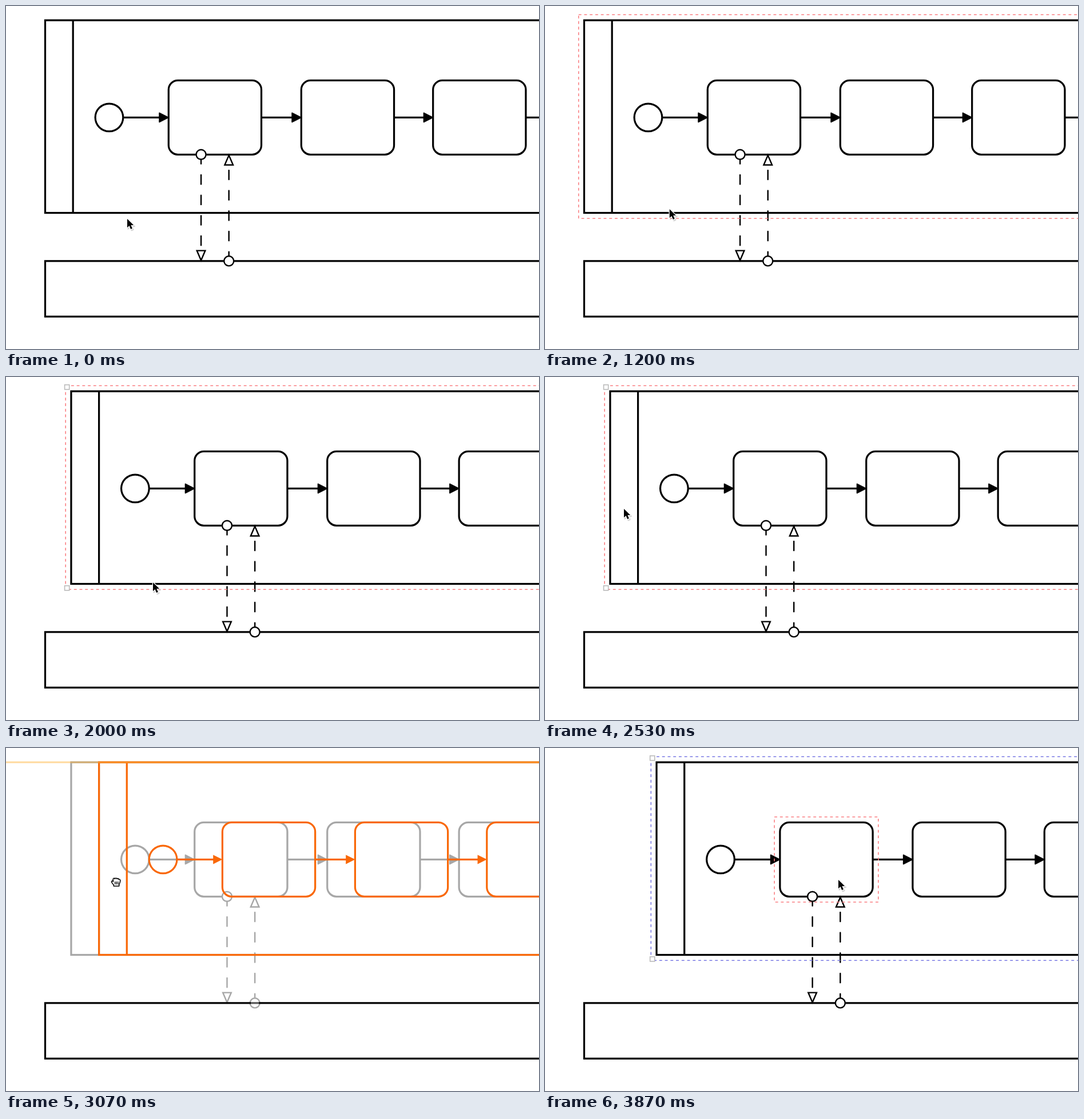
These frames come from a looping animation (932 by 601 pixels, 3990 ms). An HTML page:

```html
<!DOCTYPE html>
<html lang="en">
<head>
<meta charset="utf-8">
<title>Dragging a pool</title>
<style>
  html, body { margin: 0; width: 100%; height: 100%; overflow: hidden; background: #fff; }
  svg { display: block; width: 932px; height: 601px; }
</style>
</head>
<body>
<svg id="stage" viewBox="0 0 932 601" xmlns="http://www.w3.org/2000/svg"></svg>
<script>
// the diagram is laid out in whole units, with the pool's corner as its origin
const UNIT = 1.6225, LEFT = 68.5, TOP = 25;
const LOOP = 3990, STEP = 200 / 3;
const POOL = { x: 0, y: 0, w: 859, h: 208 };
const TASK = { x: 133, y: 65, w: 100, h: 80 };
const TASKS = [TASK.x, 276, 418];
const MID = TASK.y + TASK.h / 2, LANE = 30, LOWER = 260;
const RED = '#fa8084', BLUE = '#7a7ae4', ORANGE = '#f96808';

const rect = (x, y, w, h, more = '') =>
  `<rect x="${x}" y="${y}" width="${w}" height="${h}" ${more}/>`;

const flow = (from, to, color, edge) =>
  `<path d="M${from} ${MID}H${to - 2}" fill="none"/>
   <path d="M${to - 10} ${MID - 5}l10 5l-10 5Z" fill="${color}"
     stroke-width="${edge}" stroke-linejoin="round"/>`;

function pool(color, fill, edge) {
  const starts = [84, ...TASKS.map(x => x + TASK.w)];
  const ends = [...TASKS, 561];
  return `<g stroke="${color}" fill="${fill}" stroke-width="2">
    ${rect(POOL.x, POOL.y, POOL.w, POOL.h)}
    <path d="M${LANE} 0V${POOL.h}"/>
    <circle cx="69" cy="${MID}" r="15"/>
    ${TASKS.map(x => rect(x, TASK.y, TASK.w, TASK.h, 'rx="10"')).join('')}
    ${starts.map((s, i) => flow(s, ends[i], color, edge)).join('')}
  </g>`;
}

// dashed connection with a ring at its start and an open arrow at its end
function message(x, from, to) {
  const dir = Math.sign(to - from), tip = to - 0.75 * dir;
  return `<path d="M${x} ${from}V${tip}" stroke-dasharray="10 12" stroke-linecap="round"/>
    <circle cx="${x}" cy="${from}" r="5.25"/>
    <path d="M${x - 4.5} ${tip - 10.5 * dir}h9L${x} ${tip}Z"/>`;
}

const outline = (id, { x, y, w, h }) =>
  rect(x - 6, y - 6, w + 12, h + 12, `id="${id}" fill="none" stroke-dasharray="3"`);

const handle = y => rect(-7, y - 2.5, 5, 5, 'fill="#fff" stroke="#bbb"');

const arrow = 'M0 0V15.3L3.6 12L6.1 18L8.9 16.8L6.4 11H11.2Z';
const fist = 'M-5 -4.6C-5 -7.4-2.2 -7.4-1.8 -5.6C-1.2 -7.6 1.5 -7.4 1.9 -5.6' +
  'C2.6 -7 4.9 -6.6 5 -4.6C6.2 -5.4 7.8 -4.6 7.7 -2.6C7.6 .6 6.8 1.6 5.6 4.2V7H-3.8V5' +
  'C-5 3.2-7.6 1.6-7.6 -.8C-7.6 -2.2-5.8 -2.4-4.6 -1.2Z';

document.getElementById('stage').innerHTML = `
  <rect width="932" height="601" fill="#fff"/>
  <g transform="translate(${LEFT} ${TOP}) scale(${UNIT})">
    ${rect(0, LOWER, POOL.w, 60, 'fill="none" stroke="#000" stroke-width="2"')}
    <g id="model">
      ${pool('#000', '#fff', 1)}
      <g stroke="#000" fill="#fff" stroke-width="1.5">
        ${message(168, TASK.y + TASK.h, LOWER)}${message(198, LOWER, TASK.y + TASK.h)}
      </g>
    </g>
    <g id="ghost">${pool(ORANGE, 'none', 0)}</g>
    <path id="snap" d="M-60 0H600" stroke="#ffb43c" stroke-opacity=".5" stroke-width="2"/>
    <g id="marks">
      ${outline('poolMark', POOL)}${outline('taskMark', TASK)}
      <g id="handles">${handle(-4.5)}${handle(POOL.h + 4.5)}</g>
    </g>
  </g>
  <g id="pointer">
    <g id="arrow" stroke-linejoin="round">
      <path d="${arrow}" transform="translate(1.5 2)" stroke="#000" stroke-width="2.5" opacity=".16"/>
      <path d="${arrow}" stroke="#fff" stroke-width="2.5" paint-order="stroke"/>
    </g>
    <g id="fist" transform="translate(5 4)" stroke="#000" stroke-linejoin="round" stroke-linecap="round">
      <path d="${fist}" fill="#fff" stroke-width="1.6"/>
      <path d="M-1.4 -.6V3.4M1.2 -.6V3.6M3.8 -.6V3.4M-4.8 -4V-.8" fill="none" stroke-width="1.3"/>
    </g>
  </g>`;

const el = {};
document.querySelectorAll('[id]').forEach(n => el[n.id] = n);

// pointer moves, timed in steps
const HOME = { x: 212, y: 373 };
const MOVES = [
  { from: 0, to: 10, x: 212, y: 301 },
  { from: 10, to: 19, x: 218, y: 358 },
  { from: 22, to: 28, x: 257, y: 360 },
  { from: 31, to: 38, x: 138, y: 231 },
  { from: 42, to: 49, x: 219, y: 231 },
  { from: 53, to: 58, x: 513, y: 231 }
];

// drags advance on a ten-unit grid, starting at "first"
const DRAGS = [
  { start: 23, drop: 30, grab: 218, first: 8, end: 28 },
  { start: 43, drop: 52, grab: 138, first: 0, end: 78 }
];

function ease(from, to, k) {
  const f = Math.min(1, Math.max(0, (k - from) / (to - from)));
  return f * f * (3 - 2 * f);
}

function pointerAt(k) {
  return MOVES.reduce((p, m) => {
    const f = ease(m.from, m.to, k);
    return { x: p.x + (m.x - p.x) * f, y: p.y + (m.y - p.y) * f };
  }, HOME);
}

const onGrid = (d, first) => first + 10 * Math.max(0, Math.round((d - first) / 10));
const inside = (b, x, y) => x > b.x && x < b.x + b.w && y > b.y && y < b.y + b.h;
const show = (node, on) => node.setAttribute('display', on ? 'inline' : 'none');
const move = (node, x, y = 0) => node.setAttribute('transform', `translate(${x} ${y})`);

function draw(t) {
  const k = Math.floor((t + 4) / STEP);
  const { x, y } = pointerAt(k);
  const drag = DRAGS.find(d => k >= d.start && k < d.drop);
  const base = DRAGS.reduce((at, d) => k >= d.drop ? d.end : at, 0);

  move(el.model, base);
  el.model.setAttribute('opacity', drag ? 0.34 : 1);
  show(el.ghost, drag);
  if (drag) move(el.ghost, base + onGrid((x - drag.grab) / UNIT, drag.first));
  show(el.snap, drag && k > drag.start + 1);

  const ux = (x - LEFT) / UNIT - base, uy = (y - TOP) / UNIT;
  const hover = Math.abs(uy - POOL.h) < 6 || inside({ ...POOL, w: LANE }, ux, uy);
  const selected = k >= DRAGS[0].drop;

  show(el.marks, !drag);
  move(el.marks, base);
  show(el.poolMark, hover || selected);
  el.poolMark.setAttribute('stroke', hover ? RED : BLUE);
  show(el.taskMark, inside(TASK, ux, uy));
  el.taskMark.setAttribute('stroke', RED);
  show(el.handles, selected);

  move(el.pointer, x, y);
  show(el.arrow, !drag);
  show(el.fist, drag);
}

const begin = performance.now();
function tick() {
  draw((performance.now() - begin) % LOOP);
  requestAnimationFrame(tick);
}
tick();
</script>
</body>
</html>
```
